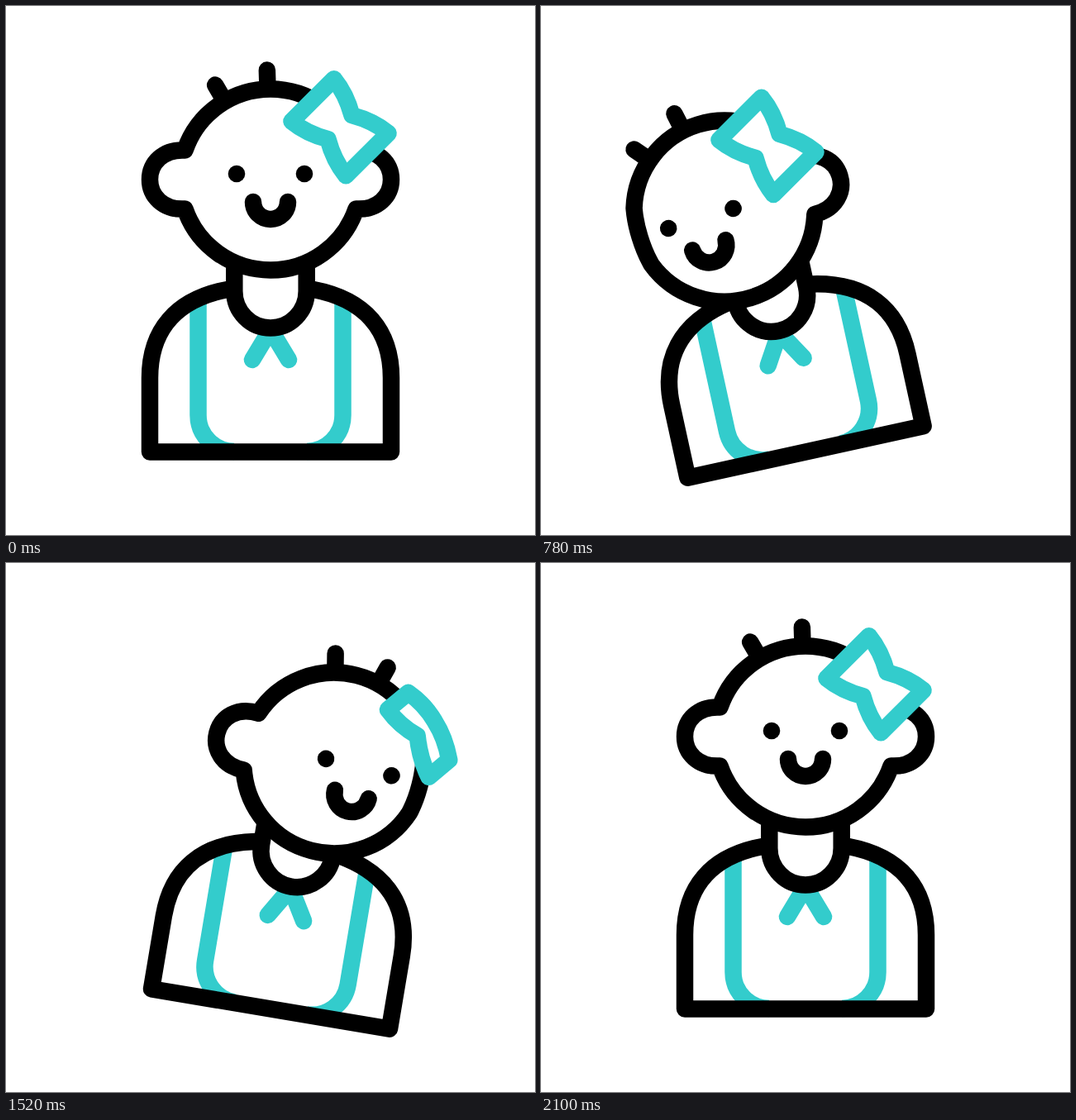
These frames come from a looping animation (640 px wide and 640 px high, 2400 ms). An HTML page:

```html
<!DOCTYPE html>
<html lang="en">
<head>
<meta charset="utf-8">
<title>Swaying baby</title>
<style>
  html, body { margin: 0; width: 100%; height: 100%; overflow: hidden; background: #fff; }
  svg { display: block; width: 100vw; height: 100vh; }
  .line { fill: none; stroke: #000; stroke-width: 20.5; stroke-linecap: round; stroke-linejoin: round; }
  .teal { stroke: #33cccc; }
  .solid { fill: #fff; }
  .butt { stroke-linecap: butt; }
</style>
</head>
<body>
<svg viewBox="0 0 640 640">
  <g id="body">
    <path class="line teal butt" d="M232.5 360V495A44 44 0 0 0 276 539M407.5 360V495A44 44 0 0 1 364 539"/>
    <path class="line teal" d="M298 428L320 391.5L342 428"/>
    <path class="line" d="M174 539.5V450C174 393 205 355 268 343H372C435 355 466 393 466 450V539.5Z"/>
    <path class="line solid butt" d="M276.3 310V345A43.7 44.5 0 0 0 363.7 345V310"/>
  </g>
  <g id="head">
    <g id="hair">
      <path class="line" d="M0 -113V-132.5" transform="rotate(-30.3)"/>
      <path class="line" d="M0 -113V-132.5" transform="rotate(-1.8)"/>
    </g>
    <path id="skull" class="line solid"/>
    <g id="face">
      <circle cx="-41" cy="-7" r="10.3"/>
      <circle cx="41" cy="-7" r="10.3"/>
      <path class="line" d="M-21 27A21 21 0 0 0 21 27"/>
    </g>
  </g>
  <path id="bow" class="line teal solid"/>
</svg>
<script>
const LOOP = 2400, STEP = 20;
const LEFT_AT = 740, RIGHT_AT = 1460, REST_AT = 2100;
const $ = id => document.getElementById(id);
const place = (id, transform) => $(id).setAttribute('transform', transform);

// Symmetric cubic ease with control points (PULL, 0) and (1 - PULL, 1).
const PULL = 0.72;
function ease(x) {
  let lo = 0, hi = 1;
  for (let i = 0; i < 30; i++) {
    const s = (lo + hi) / 2, q = 1 - s;
    const at = 3 * s * q * (q * PULL + s * (1 - PULL)) + s ** 3;
    if (at < x) lo = s; else hi = s;
  }
  return lo * lo * (3 - 2 * lo);
}

// Shares of the left and right leaning poses at time t.
function lean(t) {
  if (t < LEFT_AT) return { left: ease(t / LEFT_AT), right: 0 };
  if (t < RIGHT_AT) {
    const right = ease((t - LEFT_AT) / (RIGHT_AT - LEFT_AT));
    return { left: 1 - right, right };
  }
  if (t >= REST_AT) return { left: 0, right: 0 };
  return { left: 0, right: 1 - ease((t - RIGHT_AT) / (REST_AT - RIGHT_AT)) };
}

// Round head whose ears flatten as they turn away.
function skullPath(left, right) {
  const x = 103.5, y = 35.5, arc = 'A109.4 109.4 0 0 1';
  const ear = (side, away) => {
    const reach = 146 - 39 * away;
    const bend = x + (reach - x) * 0.62, rise = 37 - 13 * away;
    return `C${side * bend} ${-side * rise} ${side * reach} ${-side * 20} ${side * reach} 0` +
      `S${side * bend} ${side * rise} ${side * x} ${side * y}`;
  };
  return `M${-x} ${-y}${arc} ${x} ${-y}${ear(1, right)}${arc} ${-x} ${y}${ear(-1, left)}Z`;
}

// Bow knots laid out along and across its axis; the two long edges bend separately.
function bowShape({ center, along, across, upper, lower }) {
  const length = 46.5, width = 36.3;
  const edge = (dir, { bend, waist }) => [
    [-length, width], [-length / 2, bend], [0, waist], [length / 2, bend], [length, width]
  ].map(([u, v]) => [0, 1].map(i => center[i] + dir * (u * along[i] + v * across[i])));
  return [...edge(1, upper), ...edge(-1, lower)];
}
const D = Math.SQRT1_2, plain = { bend: 34, waist: 20.5 };
const BOW_FRONT = bowShape({
  center: [404, 146.7], along: [D, D], across: [D, -D], upper: plain, lower: plain
});
const BOW_SIDE = bowShape({
  center: [499.7, 208.2], along: [0.532, 0.876], across: [0.338, -0.282],
  upper: { bend: 59, waist: 58 }, lower: { bend: 32, waist: 4 }
});

function bowPath(left, right) {
  const sag = 42 * left * right;
  const p = BOW_FRONT.map(([x, y], i) => [
    x - 130.5 * left + (BOW_SIDE[i][0] - x) * right,
    y + 22.5 * left + (BOW_SIDE[i][1] - y) * right + sag
  ]);
  const side = i => `${p[i]}Q${p[i + 1]} ${p[i + 2]}Q${p[i + 3]} ${p[i + 4]}`;
  return `M${side(0)}L${side(5)}Z`;
}

function draw(t) {
  const { left, right } = lean(t);
  const sway = (toLeft, toRight) => toLeft * left + toRight * right;

  const tilt = sway(-12.4, 9.6);
  place('body', `rotate(${tilt} 320 539.5)`);

  // The head rides on the body but keeps its own angle.
  const x = 320 + sway(-33.5, 26.5), y = 210 + sway(24, 23.5);
  place('head', `rotate(${tilt} 320 540) translate(${x} ${y}) rotate(${sway(-17.1, 14.5) - tilt})`);
  place('face', `translate(${sway(-30, 30.5)} ${sway(7, 4.5)})`);
  place('hair', `rotate(${sway(-8.4, 16.8)})`);
  $('skull').setAttribute('d', skullPath(left, right));
  $('bow').setAttribute('d', bowPath(left, right));
}

const start = performance.now();
function tick() {
  const t = (performance.now() - start) % LOOP;
  draw(Math.floor(t / STEP) * STEP);
  requestAnimationFrame(tick);
}
tick();
</script>
</body>
</html>
```
